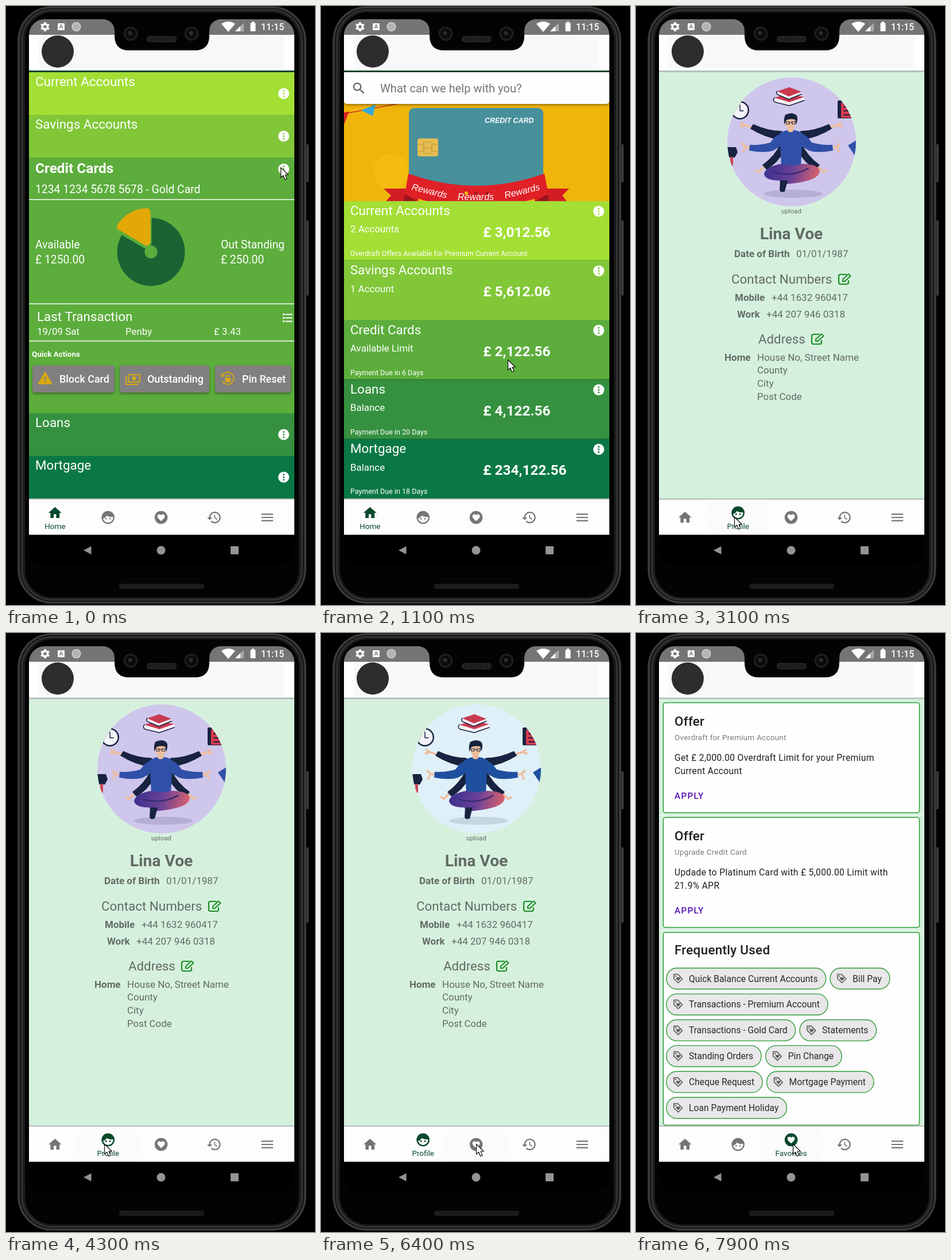
Write an HTML page with a canvas that moves like this. It is 538 px wide and 1040 px high and loops after 8000 ms.

```html
<!DOCTYPE html>
<html lang="en">
<head>
<meta charset="utf-8">
<title>Banking app</title>
<style>
html, body { margin: 0; width: 100%; height: 100%; overflow: hidden; background: #000; }
canvas { display: block; }
</style>
</head>
<body>
<canvas id="stage" width="538" height="1040"></canvas>
<script>
const c = document.getElementById('stage').getContext('2d');
const LOOP = 8000, STEP = 100;
const MINT = '#d6f0de', GREEN = '#2f9e38', DARK = '#064a2c', GREY = '#757575', INK = '#616b65';

const clamp = v => Math.max(0, Math.min(1, v));
const span = (t, a, b) => clamp((t - a) / (b - a));
const smooth = p => p * p * (3 - 2 * p);
const mix = (a, b, p) => a + (b - a) * p;

// ---- drawing helpers ----
function box(x, y, w, h, fill, r = 0, stroke, lw = 1) {
  c.beginPath();
  c.roundRect(x, y, w, h, r);
  if (fill) { c.fillStyle = fill; c.fill(); }
  if (stroke) { c.strokeStyle = stroke; c.lineWidth = lw; c.stroke(); }
}
function disc(x, y, r, fill, ry = r) {
  c.beginPath();
  c.ellipse(x, y, r, ry, 0, 0, 7);
  c.fillStyle = fill;
  c.fill();
}
function shape(d, fill) { c.fillStyle = fill; c.fill(new Path2D(d), 'evenodd'); }
function line(d, color, w = 2) {
  c.strokeStyle = color;
  c.lineWidth = w;
  c.lineCap = c.lineJoin = 'round';
  c.stroke(new Path2D(d));
}
// y is the middle of the capital letters
function text(s, x, y, size, color = '#fff', o = {}) {
  c.font = `${o.style || ''} ${o.weight || 400} ${size}px ${o.font || 'Roboto, sans-serif'}`;
  c.letterSpacing = (o.gap || 0) + 'px';
  c.textAlign = o.align || 'left';
  c.fillStyle = color;
  c.fillText(s, x, y + size * 0.355);
}
const bold = { weight: 700 }, medium = { weight: 500 };

function at(x, y, draw, scale = 1, angle = 0) {
  c.save();
  c.translate(x, y);
  c.rotate(angle);
  c.scale(scale, scale);
  draw();
  c.restore();
}
function clipTo(x, y, w, h, draw) {
  c.save();
  c.beginPath();
  c.rect(x, y, w, h);
  c.clip();
  draw();
  c.restore();
}
function faded(alpha, draw) {
  if (alpha <= 0) return;
  c.save();
  c.globalAlpha *= alpha;
  draw();
  c.restore();
}
function shadowed(draw) {
  c.save();
  c.shadowColor = 'rgba(0,0,0,.4)';
  c.shadowBlur = 4;
  c.shadowOffsetY = 2;
  draw();
  c.restore();
}

const HEART = 'M12 17.6l-.85-.78C8.1 14.1 6.2 12.3 6.2 10.2 6.2 8.4 7.5 7.1 9.3 7.1c1 0 2 .5 2.7 1.3.7-.8 1.7-1.3 2.7-1.3 1.8 0 3.1 1.3 3.1 3.1 0 2.1-1.9 3.9-4.95 6.62z';
const ICONS = {
  home: 'M10 20v-6h4v6h5v-8h3L12 3 2 12h3v8z',
  face: 'M9 12.8a1.25 1.25 0 1 0 0 2.5 1.25 1.25 0 0 0 0-2.5zM15 12.8a1.25 1.25 0 1 0 0 2.5 1.25 1.25 0 0 0 0-2.5zM12 2a10 10 0 1 0 0 20 10 10 0 0 0 0-20zM12 20C8 20 4.8 17 4.2 13.4 7 12.8 9.2 11.2 10.2 8.8 12 10.500 15 11.500 19.900 11.200 20.400 16 16.800 20 12 20z',
  heart: 'M12 2a10 10 0 1 0 0 20 10 10 0 0 0 0-20z' + HEART,
  history: 'M13 3c-4.97 0-9 4.03-9 9H1l3.96 4.03L9 12H6c0-3.87 3.13-7 7-7s7 3.13 7 7-3.13 7-7 7c-1.93 0-3.68-.79-4.94-2.06l-1.42 1.42C8.27 19.99 10.51 21 13 21c4.97 0 9-4.03 9-9s-4.03-9-9-9zM12 8v5l4.28 2.54.72-1.21-3.5-2.08V8z',
  menu: 'M3 18h18v-2H3zM3 13h18v-2H3zM3 6v2h18V6z',
  search: 'M15.5 14h-.79l-.28-.27a6.5 6.5 0 1 0-.7.7l.27.28v.79l5 4.99L20.49 19zM9.5 14a4.5 4.5 0 1 1 0-9 4.5 4.5 0 0 1 0 9z',
  warn: 'M1 21h22L12 2zM13 18h-2v-2h2zM13 14h-2v-4h2z'
};
function icon(name, x, y, color, scale = 1.123) {
  at(x, y, () => { c.translate(-12, -12); shape(ICONS[name], color); }, scale);
}

// ---- shared screen parts ----
function header(dy, edge) {
  box(40, 49, 462, 64 + dy, '#fefefe');
  box(57, 53 + dy, 427, 55, '#f8f8fa');
  disc(90, 79 + dy, 28, '#2d2d2d');
  box(40, 112 + dy, 462, 3, edge);
}

const TABS = [['home', 'Home'], ['face', 'Profile'], ['heart', 'Favorites'], ['history', ''], ['menu', '']];
function tabs(t) {
  const toProfile = span(t, 2470, 2650), toFav = span(t, 6870, 7020);
  const chosen = [1 - toProfile, toProfile - toFav, toFav, 0, 0];
  box(40, 855, 462, 3, '#b4bdb8');
  box(40, 857, 462, 61, '#fdfdfd');
  clipTo(40, 857, 462, 61, () => {
    ripple(178, t, 2250, 2500, 2900, 4900);
    ripple(270, t, 6800, 7000, 7400, LOOP, 5400);
  });
  TABS.forEach(([name, label], i) => {
    const x = 85.3 + 92.4 * i, p = chosen[i], y = 888 - 8 * smooth(p);
    icon(name, x, y, GREY);
    faded(p, () => {
      icon(name, x, y, DARK);
      text(label, x, 903, 13.5, DARK, { align: 'center' });
    });
  });
}
// press wave, with a faint hover tint before and after it
function ripple(x, t, press, hold, gone, leave, enter = press) {
  if (t < enter || t >= leave) return;
  faded(0.01 + 0.1 * (t < press ? 0 : 1 - span(t, hold, gone)), () =>
    disc(x, 888, t < press ? 55 : mix(40, 55, span(t, press, press + 100)), DARK));
}

function dots(x, y, color) {
  disc(x, y, 9.6, '#fff');
  for (const d of [-4.5, 0, 4.5]) disc(x, y + d, 1.5, color);
}

// ---- accounts page ----
const ROWS = [
  ['Current Accounts', '#a3df35', '2 Accounts', '£ 3,012.56', 'Overdraft Offers Available for Premium Current Account'],
  ['Savings Accounts', '#81c738', '1 Account', '£ 5,612.06', ''],
  ['Credit Cards', '#5cad3c', 'Available Limit', '£ 2,122.56', 'Payment Due in 6 Days'],
  ['Loans', '#35913f', 'Balance', '£ 4,122.56', 'Payment Due in 20 Days'],
  ['Mortgage', '#0a7844', 'Balance', '£ 234,122.56', 'Payment Due in 18 Days']
];

function banner() {
  box(40, 115, 462, 240, '#f0b50b');
  disc(122, 288, 31, '#f3bc0e');
  line('M40 187Q80 180 132 170', '#c9302c', 1.5);
  shape('M40 185l9-2-9 23z', '#d8232a');
  shape('M70 181l25-10-5 20z', '#35a9d6');
  shape('M109 317h60v22h-56l9-10zM432 317h-60v22h56l-8-10z', '#d31c23');
  shape('M146 326l20 13h-22zM395 326l-20 13h22z', '#98141a');
  box(153, 177, 234, 150, '#47909c', 9);
  text('CREDIT CARD', 285, 199, 12.4, '#fff', { style: 'italic', weight: 700, font: 'Liberation Sans, sans-serif' });
  box(168, 230, 36, 31, '#e6bd50', 4);
  line('M168 240h11v12h-11M204 240h-11v12h11M179 236h14v20h-14zM179 246h14', '#c2963a', 1);
  shape('M152 291Q270 333 389 291L396 327Q270 372 146 327z', '#df2027');
  [[189, 321, .24], [269.5, 331, 0], [350, 321, -.24]].forEach(([x, y, a]) => at(x, y, () =>
    text('Rewards', 0, 0, 16, '#fff', { style: 'italic', align: 'center', font: 'Liberation Sans, sans-serif' }), 1, a));
  disc(253, 325, 3, '#f3c300');
  disc(270, 325, 3, '#a5181d');
  disc(289, 325, 3, '#a5181d');
  shadowed(() => box(40, 114, 462, 56, '#fefefe', [0, 0, 5, 5]));
  icon('search', 66, 143, '#666');
  text('What can we help with you?', 103, 143, 20.1, GREY);
}

function pie() {
  const hub = 11, r = 59, slice = 'M245 409.500V357.500A56 56 0 0 0 199.500 383Z';
  c.beginPath();
  c.arc(252.5, 427, r, -Math.PI / 2, Math.PI * 7 / 6);
  c.arc(252.5, 427, hub, Math.PI * 7 / 6, -Math.PI / 2, true);
  c.fillStyle = '#1a6434';
  c.fill();
  line(slice, '#5cad3c', 17);
  line(slice, '#e3a808', 13);
  shape(slice, '#e3a808');
  disc(252.5, 427, hub, '#5cad3c');
}

function action(x, w, label, tx) {
  shadowed(() => box(x, 624, w, 47, '#808080', 4));
  text(label, tx, 648, 17.9, '#fff', medium);
}

function cardDetail() {
  const gold = '#d9a813';
  text('1234 1234 5678 5678 - Gold Card', 51, 318, 19.3);
  for (const y of [336, 517, 581.5]) box(40, y - .7, 462, 1.6, '#e4f2df');
  pie();
  text('Available', 51, 414.5, 19.3);
  text('£ 1250.00', 51, 440.5, 19.3);
  text('Out Standing', 374, 414.5, 19.3);
  text('£ 250.00', 374, 440.5, 19.3);
  text('Last Transaction', 54, 539, 22.4);
  text('19/09 Sat', 54, 565, 16.9);
  text('Penby', 208, 565, 16.9);
  text('£ 3.43', 362, 565, 16.9);
  for (const y of [535.5, 541.5, 547.5]) {
    line(`M487 ${y}H498`, '#fff', 1.8);
    disc(483.5, y, 1.8, '#fff');
  }
  text('Quick Actions', 45, 604, 13.4, '#fff', bold);
  action(46, 143, 'Block Card', 93);
  action(198, 156, 'Outstanding', 246);
  action(364, 132, 'Pin Reset', 411);
  icon('warn', 68, 646, gold, 1.2);
  box(213, 640, 20, 13, null, 1, gold, 2);
  disc(223, 646.5, 3.5, gold);
  line('M209 644V657H229', gold, 2);
  line('M376 643A10.500 10.500 0 1 1 376.500 651M374.500 639L376 643.500 380 642', gold, 1.8);
  box(381.5, 646, 9.5, 7, gold, 1);
  line('M383.500 646V643.500a2.700 2.700 0 0 1 5.400 0V646', gold, 1.5);
}

function accounts(t) {
  const p = smooth(span(t, 100, 600));
  banner();
  const tops = [115, 189, 263, 707, 781, 855].map((y, i) => mix(y, 338.5 + 103.3 * i, p));
  ROWS.forEach(([title, color, sub, sum, note], i) => {
    const y = tops[i], h = tops[i + 1] - y, open = i === 2;
    clipTo(40, y, 462, h, () => {
      box(40, y, 462, h + 1, color);
      if (open) {
        faded(1 - p, () => at(0, y - 263, cardDetail));
        text(title, 51, y + mix(18.5, 16.5, p), mix(24.4, 22.45, p), '#fff', p < .5 ? bold : {});
      } else text(title, 51, y + 16.4, 22.45);
      faded(p, () => {
        text(sub, 51, y + 49, 16.9);
        text(sum, 282, y + 54, 24.4, '#fff', bold);
        text(note, 51, y + 91, 12.5);
      });
      dots(483.5, y + mix(open ? 20 : 37, 18, p), color);
    });
  });
  header(0, '#12432a');
}

// ---- profile page ----
function pencil(x, y) {
  at(x, y, () => {
    line('M3 -8H-7Q-10 -8 -10 -5V6Q-10 9 -7 9H4Q7 9 7 6V3', '#1b8f24', 2.2);
    line('M-3 4V0.500L7 -8.500L10.500 -5L0.500 4z', '#1b8f24', 2);
  });
}

function avatar(t) {
  const lilac = t < 4700, navy = '#17233f', blue = lilac ? '#3050a8' : '#1f509f', skin = '#eebd9d';
  c.save();
  c.beginPath();
  c.arc(271, 236, 112, 0, 7);
  c.clip();
  box(158, 123, 226, 226, lilac ? '#cfc6ec' : '#dff0f8');
  disc(274, 326, 51, lilac ? '#b7aed6' : '#c4d6df', 7);
  // two books with pale page edges
  shape('M241 160L267 166 293 158V164L267 173 241 167z', '#f6f1f6');
  shape('M241 159L264 153 293 158 267 167z', '#c93a50');
  line('M241 159Q237 164 242 167L267 173 293 164', navy, 1.5);
  shape('M246 148L266 156 288 149V153L266 162 246 154z', '#f6f1f6');
  shape('M246 148L267 141 288 149 266 157z', '#c93a50');
  line('M246 148Q243 152 247 154L266 162 288 153', navy, 1.5);
  disc(181, 181, 16, navy);
  disc(181, 181, 13.5, '#f5f3fa');
  line('M181 172V182H187', navy, 1.5);
  box(351, 164, 34, 31, navy, 2);
  box(357, 168, 30, 26, '#d83a4e');
  line('M362 175H380M362 182H380M362 189H376', navy, 2);
  shape('M158 245H174L177 254 172 263H158z', navy);
  box(164, 262, 5, 15, '#cf4458');
  shape('M369 242L384 233V264z', blue);
  // both sides of the six-armed figure
  for (const side of [1, -1]) {
    c.save();
    c.translate(270, 0);
    c.scale(side, 1);
    line('M-68 211L-80 207L-87 203M-80 207L-88 209M-48 280L-56 288L-61 285M-72 246L-80 244L-85 239M-80 245L-83 253', skin, 3.5);
    shape('M-16 217Q-40 217 -66 205L-71 213Q-46 229 -16 233z', navy);
    shape('M-18 238Q-28 260 -50 276L-43 284Q-24 274 -12 252z', navy);
    shape('M-15 221Q-26 222 -36 237 -52 242 -72 241L-73 251Q-46 256 -31 251 -22 246 -14 240z', blue);
    c.restore();
  }
  shape('M250 221Q262 214 269 216 278 214 290 221L287 279H253z', blue);
  box(264, 207, 10, 12, skin, 4);
  disc(269, 202, 9, skin, 12);
  shape('M258 206Q257 194 260 189 270 184 277 188 284 191 279 206L277 197Q268 195 262 198z', navy);
  line('M262 201h5v4h-5zM272 201h5v4h-5zM267 202h5', navy, 1);
  const legs = c.createLinearGradient(223, 280, 320, 305);
  legs.addColorStop(0, '#3a2f8e');
  legs.addColorStop(.5, '#6a4196');
  legs.addColorStop(1, '#e2646a');
  shape('M253 274Q226 279 223 291 224 303 250 303L252 309H264Q320 304 320 286 317 274 287 274 275 279 253 274z', legs);
  line('M240 289Q270 298 300 282', '#33286f', 2);
  shape('M251 303H264L259 322Q251 325 250 319z', navy);
  c.restore();
}

function profile(t) {
  const dy = t < 2600 ? 27 : 0;
  box(40, 112, 462, 744, MINT);
  at(0, dy, () => {
    avatar(t);
    const mid = { align: 'center' };
    const pair = (name, value, x1, x2, y) => {
      text(name, x1, y, 17, INK, bold);
      text(value, x2, y, 17, INK);
    };
    text('upload', 270.5, 356, 11.5, INK, mid);
    text('Lina Voe', 270.5, 395, 28.2, INK, { weight: 700, align: 'center' });
    pair('Date of Birth', '01/01/1987', 171, 279, 430);
    text('Contact Numbers', 166, 474.3, 22.4, INK);
    pencil(363, 474);
    pair('Mobile', '+44 1632 960417', 172, 236, 506);
    pair('Work', '+44 207 946 0318', 176, 227, 534.5);
    text('Address', 213, 578, 22.3, INK);
    pencil(316, 578);
    pair('Home', 'House No, Street Name', 154, 211, 609.5);
    ['County', 'City', 'Post Code'].forEach((s, i) => text(s, 211, 632.5 + 22.8 * i, 16.9, INK));
  });
  header(dy, '#b3c2b8');
}

// ---- favorites page ----
const OFFERS = [
  ['Overdraft for Premium Account', 'Get £ 2,000.00 Overdraft Limit for your Premium', 'Current Account'],
  ['Upgrade Credit Card', 'Updade to Platinum Card with £ 5,000.00 Limit with', '21.9% APR']
];
const CHIPS = [
  ['Quick Balance Current Accounts', 'Bill Pay'], ['Transactions - Premium Account'],
  ['Transactions - Gold Card', 'Statements'], ['Standing Orders', 'Pin Change'],
  ['Cheque Request', 'Mortgage Payment'], ['Loan Payment Holiday']
];

function chip(label, x, y) {
  c.font = '400 15.7px Roboto, sans-serif';
  c.letterSpacing = '0px';
  const w = c.measureText(label).width + 53;
  box(x, y - 18.3, w, 36.6, '#e9e7e9', 18, GREEN, 1.4);
  text(label, x + 39, y, 15.7, '#2a2a2a');
  at(x + 20, y, () => {
    line('M-7 -7.5H0L7.5 0.5L0.5 7.5L-7 0z', '#606060', 1.7);
    disc(-3.8, -4.3, 1.3, '#606060');
    at(.5, .5, () => { c.translate(-12, -12); shape(HEART, '#606060'); }, .6);
  });
  return x + w + 7.5;
}

function favorites(t) {
  const dy = t < 7000 ? 27 : 0, ink = '#1f1f1f';
  box(40, 112, 462, 744, MINT);
  clipTo(40, 112, 462, 744, () => at(0, dy, () => {
    OFFERS.forEach(([sub, a, b], i) => {
      const y = 121 + 199.3 * i;
      box(47.5, y, 446, 191, '#fefefe', 4, GREEN, 1.6);
      box(40, y + 195, 462, 1, '#edf8f0');
      text('Offer', 67, y + 32, 22.5, ink, { weight: 500, gap: .2 });
      text(sub, 67, y + 60, 13.5, '#7b7b7b', { gap: .26 });
      text(a, 67, y + 95.5, 15.7, ink, { gap: .3 });
      text(b, 67, y + 118, 15.7, ink, { gap: .3 });
      text('APPLY', 67, y + 161.5, 15.4, '#5410b8', { weight: 500, gap: 1.2 });
    });
    box(47.5, 520, 446, 334.5, '#fefefe', 4, GREEN, 1.6);
    text('Frequently Used', 67, 550, 22.5, ink, { weight: 500, gap: .25 });
    CHIPS.forEach((row, i) => row.reduce((x, label) => chip(label, x, 600 + 44.9 * i), 53));
  }));
  header(dy, '#b9c8be');
}

// ---- phone ----
function body() {
  box(522, 240, 5, 66, '#3a3a3c', 2);
  box(522, 372, 5, 131, '#3a3a3c', 2);
  box(20, 0, 503, 1038, '#2b2b2d', 60);
  box(22.5, 2.5, 498, 1033, '#1c1c1d', 57, '#4a4a4c', 1.5);
  box(28, 7, 487, 1024, '#1c1c1d', 53, '#38383a', 2);
  box(33, 11, 477, 1016, '#030304', 48);
  box(197, 1003, 148, 9, '#1b1b1c', 4);
}

function status() {
  box(40, 23, 462, 27, '#757575', [28, 28, 0, 0]);
  c.beginPath();
  c.arc(68, 36, 4.5, 0, 7);
  c.strokeStyle = '#fff';
  c.lineWidth = 3.6;
  c.stroke();
  for (let i = 0; i < 6; i++) at(68, 36, () => box(-1.8, -8, 3.6, 3, '#fff'), 1, i * Math.PI / 3);
  box(90, 30, 12, 12, '#fff', 1);
  text('A', 96, 36, 9.5, '#757575', { weight: 700, align: 'center' });
  disc(122.5, 36, 8, '#dcdcdc');
  disc(122.5, 36, 6.8, '#b3b3b3');
  shape('M375 31Q387 23 399 31L387 45z', '#fff');
  shape('M399 44H414V29z', '#a9a9a9');
  shape('M399 44H408V35z', '#fff');
  box(425.5, 29, 9, 15, '#fff', 1.5);
  box(428, 27, 4, 3, '#fff');
  text('11:15', 444, 36.5, 15.9, '#fff', medium);
}

function notch() {
  shape('M163 22Q189 23 189 44V53Q190 77 214 77H329Q353 77 354 53V44Q354 23 380 22z', '#030304');
  for (const x of [217, 323]) {
    disc(x, 48, 12.5, '#1d1d1f');
    disc(x, 48, 9, '#0b0b0d');
    disc(x - 1, 47, 3.5, '#2c2c30');
  }
  box(245, 52, 52, 11, '#252527', 5);
  for (let x = 249; x < 294; x += 4) box(x, 54, 1.5, 7, '#131314');
}

function systemBar() {
  box(40, 918, 462, 54, '#000', [0, 0, 28, 28]);
  shape('M135 945L148.5 938V952z', '#949494');
  disc(270, 945, 7.5, '#949494');
  box(391, 938, 14, 14, '#949494', 1);
}

// time, x, y, easing into this point
const WAY = [
  [0, 478, 280], [250, 478, 280], [1100, 325, 614, p => p ** 1.6], [2200, 171, 887, p => 1 - (1 - p) ** 1.8],
  [4700, 171, 887], [5500, 270, 887], [7000, 270, 887], [7700, 273, 887], [LOOP, 273, 887]
];
function pointer(t) {
  const i = WAY.findIndex(k => k[0] > t), a = WAY[i - 1], b = WAY[i];
  const p = (b[3] || smooth)(span(t, a[0], b[0]));
  at(mix(a[1], b[1], p), mix(a[2], b[2], p), () => {
    const arrow = 'M.5 .5V18L4.7 14.3 7.7 21.5 11 20 8 13H13.3z';
    shape(arrow, '#fff');
    line(arrow, '#111', 1.2);
  });
}

function frame(now) {
  const t = Math.floor(now % LOOP / STEP) * STEP;
  c.fillStyle = '#000';
  c.fillRect(0, 0, 538, 1040);
  body();
  const page = t < 2500 ? accounts : t < 6900 ? profile : favorites;
  page(t);
  status();
  notch();
  tabs(t);
  systemBar();
  pointer(t);
  requestAnimationFrame(frame);
}
requestAnimationFrame(frame);
</script>
</body>
</html>
```
